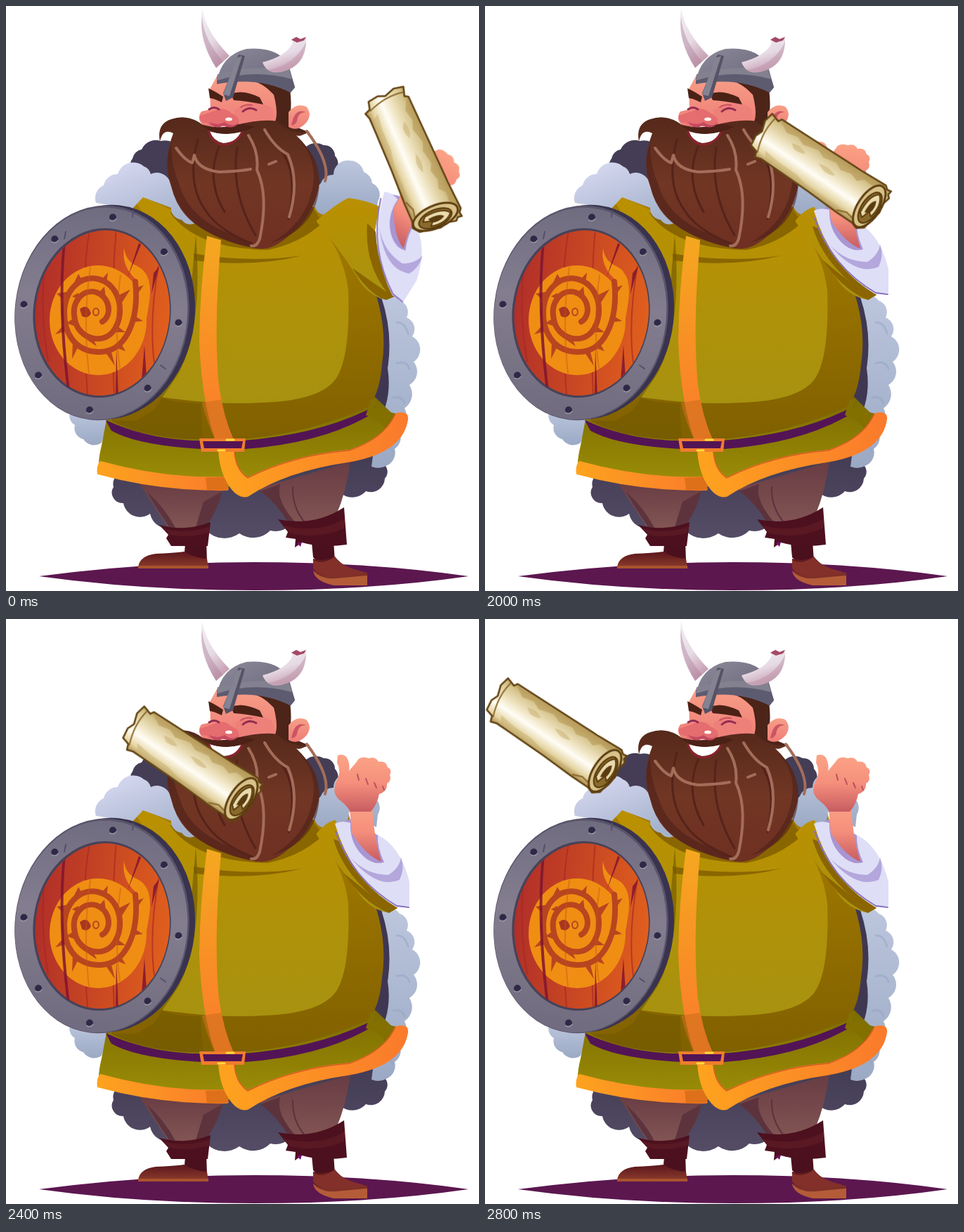
These frames come from a looping animation (673x832 px, 3000 ms). An HTML page:

```html
<!DOCTYPE html>
<html lang="en">
<head>
<meta charset="utf-8">
<title>Viking tossing a scroll</title>
<style>
html, body { margin: 0; width: 100%; height: 100%; overflow: hidden; background: #fff; }
svg { display: block; width: 100%; height: 100%; }
.line { fill: none; stroke-linecap: round; stroke-linejoin: round; }

/* Every pose is held, then switched at once. */
.scroll, .arm, .sleeve { animation: 3s step-end infinite; }
.scroll { animation-name: fly; }
.arm { animation-name: swing; transform-origin: 550px 400px; }
.sleeve.out { animation-name: out; }
.sleeve.mid { animation-name: mid; }
.sleeve.in { animation-name: in; }
@keyframes fly {
  0% { transform: translate(540px, 129px) rotate(66.5deg); }
  60% { transform: translate(468px, 138px) rotate(51deg); }
  66.66% { transform: translate(395px, 179px) rotate(34deg); }
  73.33% { transform: translate(282px, 165px) rotate(34deg); }
  80% { transform: translate(183px, 150px) rotate(34deg); }
  86.66% { transform: translate(76px, 135px) rotate(34deg); }
  93.33%, 100% { transform: translate(19px, 110px) rotate(34deg); }
}
@keyframes swing {
  0% { transform: rotate(32deg); }
  60% { transform: rotate(16deg); }
  66.66%, 100% { transform: none; }
}
@keyframes out { 0% { visibility: visible; } 60%, 100% { visibility: hidden; } }
@keyframes mid { 0% { visibility: hidden; } 60% { visibility: visible; } 66.66%, 100% { visibility: hidden; } }
@keyframes in { 0% { visibility: hidden; } 66.66%, 100% { visibility: visible; } }
</style>
</head>
<body>
<svg viewBox="0 0 673 832" preserveAspectRatio="none">
<defs>
  <linearGradient id="tunic" x1="0" y1="0" x2="0" y2="1"><stop stop-color="#ba9000"/><stop offset="1" stop-color="#a79210"/></linearGradient>
  <linearGradient id="shade" x1="0" y1="0" x2="0" y2="1"><stop stop-color="#a77d00"/><stop offset="1" stop-color="#806000"/></linearGradient>
  <linearGradient id="skirt" x1="0" y1="0" x2="0" y2="1"><stop stop-color="#7d6b00"/><stop offset="1" stop-color="#9c8f08"/></linearGradient>
  <linearGradient id="trim" x1="0" y1="0" x2="0" y2="1"><stop stop-color="#f5a820"/><stop offset="1" stop-color="#fb7a2b"/></linearGradient>
  <linearGradient id="hem" x1="0" y1="0" x2="1" y2="0"><stop stop-color="#fda31e"/><stop offset="1" stop-color="#fa7a2c"/></linearGradient>
  <linearGradient id="wool" x1="0" y1="0" x2=".6" y2="1"><stop stop-color="#dcdcf5"/><stop offset="1" stop-color="#a6b3cc"/></linearGradient>
  <linearGradient id="pelt" x1="0" y1="0" x2="0" y2="1"><stop stop-color="#bcc6dd"/><stop offset="1" stop-color="#9ba9c4"/></linearGradient>
  <linearGradient id="dark" x1="0" y1="0" x2="0" y2="1"><stop stop-color="#3d374f"/><stop offset="1" stop-color="#554c66"/></linearGradient>
  <linearGradient id="leg" x1="0" y1="0" x2="0" y2="1"><stop stop-color="#673c43"/><stop offset="1" stop-color="#835554"/></linearGradient>
  <linearGradient id="boot" x1="0" y1="0" x2="0" y2="1"><stop stop-color="#5a161c"/><stop offset="1" stop-color="#8d3c2c"/></linearGradient>
  <linearGradient id="wood" x1="0" y1="0" x2="1" y2="0"><stop stop-color="#b12f28"/><stop offset="1" stop-color="#e05f1d"/></linearGradient>
  <linearGradient id="rim" x1="0" y1="0" x2="0" y2="1"><stop stop-color="#706c80"/><stop offset=".45" stop-color="#837d8f"/><stop offset="1" stop-color="#716b7f"/></linearGradient>
  <linearGradient id="horn" x1="0" y1="0" x2=".4" y2="1"><stop stop-color="#f3f0f5"/><stop offset=".6" stop-color="#e6dae4"/><stop offset="1" stop-color="#c9a3b5"/></linearGradient>
  <linearGradient id="steel" x1="0" y1="0" x2="1" y2="1"><stop stop-color="#8e8c9b"/><stop offset="1" stop-color="#615f72"/></linearGradient>
  <linearGradient id="skin" x1="0" y1="0" x2="0" y2="1"><stop stop-color="#f79f87"/><stop offset="1" stop-color="#ee7d77"/></linearGradient>
  <linearGradient id="hand" x1="0" y1="0" x2="0" y2="1"><stop stop-color="#fca486"/><stop offset=".5" stop-color="#f58f7c"/><stop offset="1" stop-color="#c75c61"/></linearGradient>
  <linearGradient id="beard" x1="0" y1="0" x2="0" y2="1"><stop stop-color="#55291b"/><stop offset=".5" stop-color="#713624"/><stop offset="1" stop-color="#6f3022"/></linearGradient>
  <linearGradient id="paper" gradientUnits="userSpaceOnUse" x1="0" y1="-36" x2="0" y2="40">
    <stop stop-color="#a68945"/><stop offset=".2" stop-color="#d6c48d"/><stop offset=".42" stop-color="#efe4c2"/>
    <stop offset=".6" stop-color="#fffdf6"/><stop offset=".8" stop-color="#e5d5a3"/><stop offset="1" stop-color="#94702a"/>
  </linearGradient>
  <clipPath id="planks"><circle r="117" transform="matrix(.81 .095 -.113 1 136.5 437.5)"/></clipPath>
</defs>

<path fill="#5c174f" d="M47 811Q200 791 352 791Q520 791 658 811Q520 831 352 831Q190 831 47 811Z"/>

<!-- cape -->
<path fill="url(#dark)" d="M172 664A16 16 0 0 0 153 684A15 15 0 0 0 167 707A24 24 0 0 0 205 722A26 26 0 0 0 238 742A34 34 0 0 0 286 747A36 36 0 0 0 332 750A34 34 0 0 0 376 746A28 28 0 0 0 408 733L475 692A26 26 0 0 0 512 690A20 20 0 0 0 539 672A14 14 0 0 0 535 650L500 600H200Z"/>
<path fill="#3f3752" d="M500 380L542 412L562 470L568 545L540 600L500 640Z"/>
<path fill="url(#pelt)" d="M534 414A20 20 0 0 1 560 419A17 17 0 0 1 570 443A18 18 0 0 1 578 470A21 21 0 0 1 580 506A22 22 0 0 1 574 539A24 24 0 0 1 567 572A22 22 0 0 1 558 602A20 20 0 0 1 553 630A20 20 0 0 1 541 654A24 24 0 0 1 520 655L528 595Q550 560 543 515Q551 465 534 414Z"/>
<path class="line" stroke="#92a0bd" stroke-width="3" opacity=".45" d="M556 450q12 0 16 16M556 508q14-4 18 8M551 557q13-3 16 8M538 625q10-2 12 8"/>
<path fill="url(#pelt)" d="M92 575A16 16 0 0 0 98 596A16 16 0 0 0 110 616A18 18 0 0 0 136 621L150 580Z"/>

<!-- legs -->
<path fill="url(#leg)" d="M187 675L311 682Q299 718 278 744L232 743Q211 712 187 675Z"/>
<path fill="#5d343d" d="M308 690L281 705L270 741H284Q302 716 308 690ZM200 690Q225 712 241 742L232 741Q212 712 200 690Z"/>
<path fill="url(#leg)" d="M360 686L490 648Q484 691 470 724L405 740Q389 712 360 686Z"/>
<path fill="#5c333c" d="M362 690L390 680Q383 704 415 738L402 736Q386 708 362 690Z"/>
<path class="line" stroke="#5c333c" stroke-width="2" d="M408 684Q407 712 424 733"/>
<path fill="#4b101d" d="M255 765L285 760L286 790Q270 797 254 776ZM435 763L466 760L468 790Q446 796 437 784Z"/>
<path fill="url(#boot)" d="M188 798Q190 782 213 779Q238 778 254 776Q267 785 286 786L288 799Z"/>
<path fill="#a9532f" d="M188 796H288V800H188Z"/>
<path fill="url(#boot)" d="M437 786Q452 791 468 783Q481 801 514 806V823H467Q435 817 437 786Z"/>
<path fill="#b45c38" d="M437 803Q448 816 470 814L514 810V824H466Q439 818 437 803Z"/>
<path fill="#83302a" d="M437 788Q450 796 468 783Q474 796 506 804L512 807Q493 811 471 810Q447 812 437 800Z"/>
<path fill="#4d101f" d="M218 738Q255 748 291 734L287 768H235L228 757L231 752Z"/>
<path fill="#581824" d="M224 743Q258 752 290 740L289 749Q256 758 232 752Z"/>
<path fill="#4d101f" d="M387 730Q438 741 481 713L485 766Q448 771 421 763L411 770L412 758L398 756L401 748Z"/>
<path fill="#5a1823" d="M394 739Q446 751 482 729V742Q449 759 404 750Z"/>
<path fill="#760c75" d="M414 764L421 762L419 769Z"/>

<!-- skirt and body -->
<path fill="url(#skirt)" d="M143 588L525 556L552 582Q555 616 490 632Q410 636 344 675L316 684Q222 686 132 658Q131 645 136 625Z"/>
<path fill="url(#shade)" d="M180 285L193 268L270 300L440 285L487 274L506 360Q546 440 535 510Q531 555 514 571Q400 621 280 617Q192 615 150 590Z"/>
<path fill="url(#tunic)" d="M186 281L193 270L235 290Q249 320 290 326L360 344L441 305Q480 347 487 404Q490 490 473 524Q455 561 365 564Q300 568 212 555L270 410Z"/>
<path fill="#8a6600" d="M233 293Q268 345 372 347Q418 338 451 308L435 285H272L250 301ZM267 352Q347 366 421 355Q354 372 268 362Z"/>
<path class="line" stroke="#765700" stroke-width="2" d="M441 306Q480 340 514 399"/>
<path fill="#735b00" opacity=".65" d="M270 325Q281 460 244 525L210 575L185 590L150 590Q210 618 280 616L277 565Q240 565 214 555L260 440Z"/>
<path fill="url(#trim)" d="M286 327L306 333Q295 460 303 540Q309 584 324 617L298 618Q278 560 275 476Q276 400 286 327Z"/>
<path fill="#ce711c" opacity=".6" d="M279 564L306 560Q313 594 324 617L298 618Q285 590 279 564Z"/>
<path fill="#531455" d="M142 589Q205 618 279 618H337Q450 609 525 569L521 580Q451 622 340 630H279Q187 625 150 604Z"/>
<path fill="#837000" d="M519 560L527 558L524 572L560 581L542 604Q532 588 512 582Z"/>
<path fill="url(#hem)" d="M134 647Q228 673 314 669L316 689Q222 691 130 666Q128 654 134 647Z"/>
<path fill="#dd7019" d="M284 671L314 670L317 688L286 689Z"/>
<path fill="url(#hem)" d="M302 632H325Q327 659 344 670Q411 637 489 631Q541 613 555 579Q574 575 572 588Q565 636 487 649Q398 662 344 698Q329 701 317 682Q304 663 302 632Z"/>
<path class="line" stroke="#d45d23" stroke-width="1.5" d="M325 634Q327 660 344 671Q411 638 489 632Q539 614 553 581"/>
<path fill="#ef7d2d" fill-rule="evenodd" d="M275 615H341L339 634H278ZM280 619L282 629H335L337 619Z"/>
<path class="line" stroke="#ffdc38" stroke-width="3" d="M314 617h10M302 632h9"/>

<!-- collar -->
<path fill="#443d55" d="M183 242A18 18 0 0 1 180 217A16 16 0 0 1 193 204A22 22 0 0 1 220 192A24 24 0 0 1 248 205V265H205ZM425 202A22 22 0 0 1 452 198A15 15 0 0 1 468 213A18 18 0 0 1 468 237L474 262H425Z"/>
<path fill="url(#wool)" d="M128 280A20 20 0 0 1 139 255A20 20 0 0 1 159 239A23 23 0 0 1 196 228A16 16 0 0 1 206 239A20 20 0 0 1 232 247L270 285V308A14 14 0 0 1 250 304A16 16 0 0 1 235 287L195 272L180 288Z"/>
<path fill="url(#pelt)" d="M430 270L448 252A18 18 0 0 1 466 240A20 20 0 0 1 490 220A20 20 0 0 1 509 236A18 18 0 0 1 521 252A18 18 0 0 1 529 278L527 296L487 274A14 14 0 0 1 467 291A16 16 0 0 1 442 291Z"/>

<!-- shield -->
<g transform="matrix(.81 .095 -.113 1 136.5 436.5)">
  <circle cx="10" cy="-2" r="152" fill="#39334f"/>
  <circle r="152" fill="#5a556b"/>
  <circle cx="-1" cy="1" r="150" fill="url(#rim)"/>
  <circle r="120" fill="#484258"/>
  <circle cx="1" r="117" fill="url(#wood)"/>
</g>
<g clip-path="url(#planks)">
  <path class="line" stroke="#a52724" stroke-width="2" opacity=".65" d="M120 315Q105 380 116 555M157 315Q148 420 154 555M218 364Q203 445 211 508M55 365Q48 440 60 505"/>
  <ellipse cx="131" cy="447" rx="69" ry="78" fill="#ef8e13"/>
  <path fill="#ef8e13" d="M168 344Q170 363 187 370Q211 382 203 426Q197 470 180 488L168 450Q194 413 185 389Q164 370 168 344Z"/>
  <path class="line" stroke="#b8451f" stroke-width="8" d="M184 392C190 449 169 494 131 492C96 491 82 462 83 434C85 400 108 384 130 388C161 395 170 434 155 459C140 484 103 474 98 446C92 421 109 402 128 407C149 414 151 441 137 449"/>
  <path fill="#b8451f" d="M96 395L103 381L109 391ZM134 391L145 379L143 395ZM159 412L177 403L163 425ZM154 452L170 464L151 464ZM121 467L129 484L110 471ZM98 443L86 451L97 455ZM103 417L94 413L103 408ZM130 410L140 399L142 416ZM180 439L195 448L178 450ZM162 477L170 491L154 485ZM149 488L155 512L139 489ZM104 482L94 502L95 477ZM87 462L70 467L85 450ZM85 421L72 409L90 406ZM182 402L196 397L184 414Z"/>
  <path fill="#a83720" d="M105 431Q116 422 121 437Q116 446 108 441Z"/>
  <ellipse class="line" cx="128" cy="435" rx="4" ry="5" stroke="#b8451f" stroke-width="2"/>
  <path class="line" stroke="#c65417" stroke-width="2" opacity=".45" d="M120 372Q109 446 118 522M163 383Q153 450 162 515"/>
  <path fill="#7f1530" opacity=".85" d="M83 318L87 318Q74 415 92 556L88 554Q70 421 83 318ZM190 334L195 332L173 386ZM157 485L160 557L156 557ZM210 380L218 370L207 410ZM197 482L200 530L192 544Z"/>
</g>
<g id="nails"></g>
<path class="line" stroke="#55506a" stroke-width="2" d="M181 291l-1 9M85 321l-2 10M227 516l-7-5"/>

<!-- head -->
<path fill="#4c2418" d="M337 95L402 105Q409 145 402 163Q417 176 432 179Q420 186 403 179L376 170Z"/>
<path fill="url(#skin)" d="M402 151Q413 137 427 143Q436 153 428 165Q415 180 402 172Z"/>
<path fill="#cb5464" d="M408 162Q413 145 427 151Q415 151 414 164Q410 171 406 169Z"/>
<path fill="url(#skin)" d="M301 98H340Q365 109 381 126Q391 165 376 172L282 171Q270 161 278 150L291 147L290 118Z"/>
<path fill="#4c2418" d="M338 104Q366 107 383 128L378 100Z"/>
<path fill="#ee807a" d="M325 148Q351 129 378 145Q386 168 365 171L330 167Z"/>
<path fill="url(#beard)" d="M219 193Q214 168 235 161Q259 153 280 169Q306 175 325 170Q363 160 386 164Q405 183 430 179Q418 187 413 184Q447 216 445 258Q435 304 401 328Q378 348 358 345Q312 338 278 316Q244 296 235 256Q222 222 238 181Q223 173 219 193Z"/>
<path fill="#4c1f18" opacity=".55" d="M235 195Q224 223 235 256Q244 292 278 316Q313 337 358 345Q338 330 309 320Q259 297 247 255Q234 225 235 195ZM417 190Q448 224 433 271Q421 312 377 337Q445 316 446 250Q444 211 417 190Z"/>
<path class="line" stroke="#55231a" stroke-width="3" d="M273 190Q256 252 284 291Q302 319 350 338M303 200Q284 247 311 293M329 201Q319 265 355 326M385 199Q418 230 402 303"/>
<path class="line" stroke="#a36d59" stroke-width="4" d="M242 202Q255 220 265 223L268 212Q272 232 303 236Q333 235 348 232M345 184Q360 207 357 233Q374 269 361 331Q357 343 349 341M368 176Q383 202 401 211Q418 249 403 300M374 225L384 221M428 178Q462 223 454 249"/>
<path fill="#fff" d="M289 178Q311 185 336 178Q329 194 309 195Q295 192 289 178Z"/>
<path class="line" stroke="#8b222e" stroke-width="3" d="M289 179Q295 196 310 197Q328 196 336 179"/>
<path fill="#4d2117" d="M278 169Q301 177 324 169Q339 166 354 172Q336 181 314 182Q293 182 278 169Z"/>
<path fill="#e56c6f" d="M276 156Q291 151 302 147Q312 144 321 153Q334 158 331 168Q321 174 308 168Q295 177 286 166Q274 166 276 156Z"/>
<path fill="#c44a60" d="M289 165Q302 171 311 165Q323 174 331 165Q325 177 309 170Q297 177 289 165Z"/>
<ellipse cx="317" cy="161" rx="5" ry="2.5" fill="#fff4ee"/>
<path class="line" stroke="#922c50" stroke-width="3" d="M289 147q7-5 14 0M337 150q9-8 19-2"/>
<path class="line" stroke="#c9525f" stroke-width="2" d="M334 144q7-5 16-3"/>
<path fill="#4b2116" d="M288 117Q297 121 309 129L307 137Q295 131 290 131ZM320 125Q337 118 361 130L366 140Q341 135 324 134Z"/>
<path fill="url(#horn)" d="M279 3Q284 36 318 71L299 88Q273 47 279 3Z"/>
<path fill="#a77c96" opacity=".4" d="M279 15Q281 48 309 79L299 88Q274 50 279 15Z"/>
<path fill="url(#steel)" d="M300 108Q306 70 342 61Q390 57 403 87L411 116L405 123Q363 103 323 107Z"/>
<path fill="#5d5b70" d="M300 101Q350 84 404 93L411 115L405 123Q360 100 300 111Z"/>
<path fill="#83808f" d="M301 97Q350 83 403 91L407 104Q353 89 300 106Z"/>
<path fill="#555367" d="M331 69L340 71L323 130L313 135L309 124Z"/>
<path fill="#858391" d="M328 74L336 71L318 128L309 126Z"/>
<path fill="url(#horn)" d="M365 80Q400 71 408 52L406 47L413 44L419 47L427 44Q429 80 401 91Q385 97 376 93Q368 89 365 80Z"/>
<path fill="#a44966" d="M406 48L413 44L419 47L427 44L424 49L414 52Z"/>
<path fill="#bd93a9" opacity=".5" d="M427 51Q425 81 399 91Q381 96 372 91Q411 84 427 51Z"/>

<!-- right arm -->
<g class="sleeve out">
  <path fill="url(#tunic)" d="M441 306Q470 281 487 273Q508 275 531 285L525 320Q529 378 558 411L541 418Q520 414 504 393Q480 352 441 306Z"/>
  <path fill="#8a6500" d="M514 309L526 321Q529 381 558 411L541 418Q517 411 493 373L542 407Q510 367 514 309Z"/>
</g>
<g class="sleeve mid">
  <path fill="url(#tunic)" d="M441 306Q470 281 487 274L511 281L498 302Q508 372 554 410L542 418Q520 414 504 393Z"/>
  <path fill="#8a6500" d="M488 306L500 318Q513 377 554 410L542 418Q513 407 485 365L528 400Q491 358 488 306Z"/>
</g>
<g class="sleeve in">
  <path fill="url(#tunic)" d="M441 306Q457 287 469 286L473 303Q493 372 557 411L545 418Q520 414 504 393Z"/>
  <path fill="#8a6500" d="M466 313L474 316Q499 377 557 411L545 418Q510 405 480 361L526 398Q479 360 466 313Z"/>
</g>
<g class="arm">
  <path fill="#a895d2" d="M469 292L492 284L528 307Q551 324 562 355L536 368L493 339Z"/>
  <path fill="url(#hand)" d="M488 258L521 266Q523 309 534 345Q512 337 492 304Z"/>
  <path fill="url(#hand)" d="M472 194Q480 191 485 197Q490 207 488 216L499 203Q503 194 516 198Q526 195 530 203Q541 201 543 211Q550 214 546 222Q549 230 542 234Q543 245 531 249Q528 264 519 274H490Q484 264 474 257Q463 247 470 231Q478 218 471 204Z"/>
  <path class="line" stroke="#b8535b" stroke-width="2" d="M500 221l2 8M512 227l3 8M524 233l3 7M536 238l2 5"/>
  <path fill="#dfdef7" d="M468 291Q478 286 490 290Q489 318 507 336Q522 351 538 346Q528 325 529 307Q562 324 574 374V408L556 410Q491 371 468 291Z"/>
  <path class="line" stroke="#8870be" stroke-width="2" d="M469 302Q493 371 556 408L573 410"/>
  <path fill="#b3a7dc" d="M489 338Q512 364 544 364Q560 354 562 339Q568 354 560 371Q527 385 489 338Z"/>
</g>

<!-- scroll -->
<g class="scroll" stroke-linejoin="round">
  <path fill="url(#paper)" stroke="#634414" stroke-width="2.5" d="M-3 -29L10 -25L13 -30L60 -31L150 -33L188 -35L193 -31L199 -32L198 -26L202 -22L199 -10L202 2L198 20L196 32L187 39L178 36L150 36L100 34L20 33L11 36L8 28L-3 25L-5 10L-1 0L-6 -15Z"/>
  <path fill="#b99c59" opacity=".65" d="M12 -28L70 -29L150 -31L186 -32L177 -23L159 -25L150 -17L138 -21L122 -17L112 -22L92 -18L80 -23L58 -17L46 -22L29 -18Z"/>
  <path fill="#c8b174" opacity=".55" d="M43 -10q14-6 25 2q-10 5-18 3zM91 -7q14-6 29 1q-8 5-18 3zM18 20l25 3l30 0l22 5l45 1l16 4l-56-1l-75-2z"/>
  <path class="line" stroke="#8c692b" stroke-width="2" d="M4 -25Q-1 0 10 28M150 33l13-5l10 2"/>
  <ellipse cx="185" cy="3" rx="16" ry="34" fill="#d9c28a" stroke="#5d3e10" stroke-width="3"/>
  <ellipse cx="187" cy="4" rx="12" ry="25" fill="#8a6a2c" stroke="#543609" stroke-width="2"/>
  <path fill="#eadbad" stroke="#593a0d" stroke-width="2" d="M179 17Q176 -11 188 -19Q200 -8 195 14L189 9L185 22Z"/>
  <path fill="#5b3b10" d="M184 14Q182 -4 189 -9Q194 0 191 10Z"/>
</g>
</svg>
<script>
// Eight nails sit on the slanted ellipse of the rim.
const nails = document.getElementById('nails');
for (let i = 0; i < 8; i++) {
  const a = i * Math.PI / 4, c = Math.cos(a), s = Math.sin(a);
  const x = 135.5 + 110 * c - 16.5 * s, y = 437.5 + 13 * c + 137 * s;
  nails.innerHTML += `<circle cx="${x}" cy="${y}" r="5" fill="#2d2946"/>` +
    `<path class="line" stroke="#9993a3" stroke-width="1.5" d="M${x - 4} ${y + 4}q5 3 9-2"/>`;
}
</script>
</body>
</html>
```
